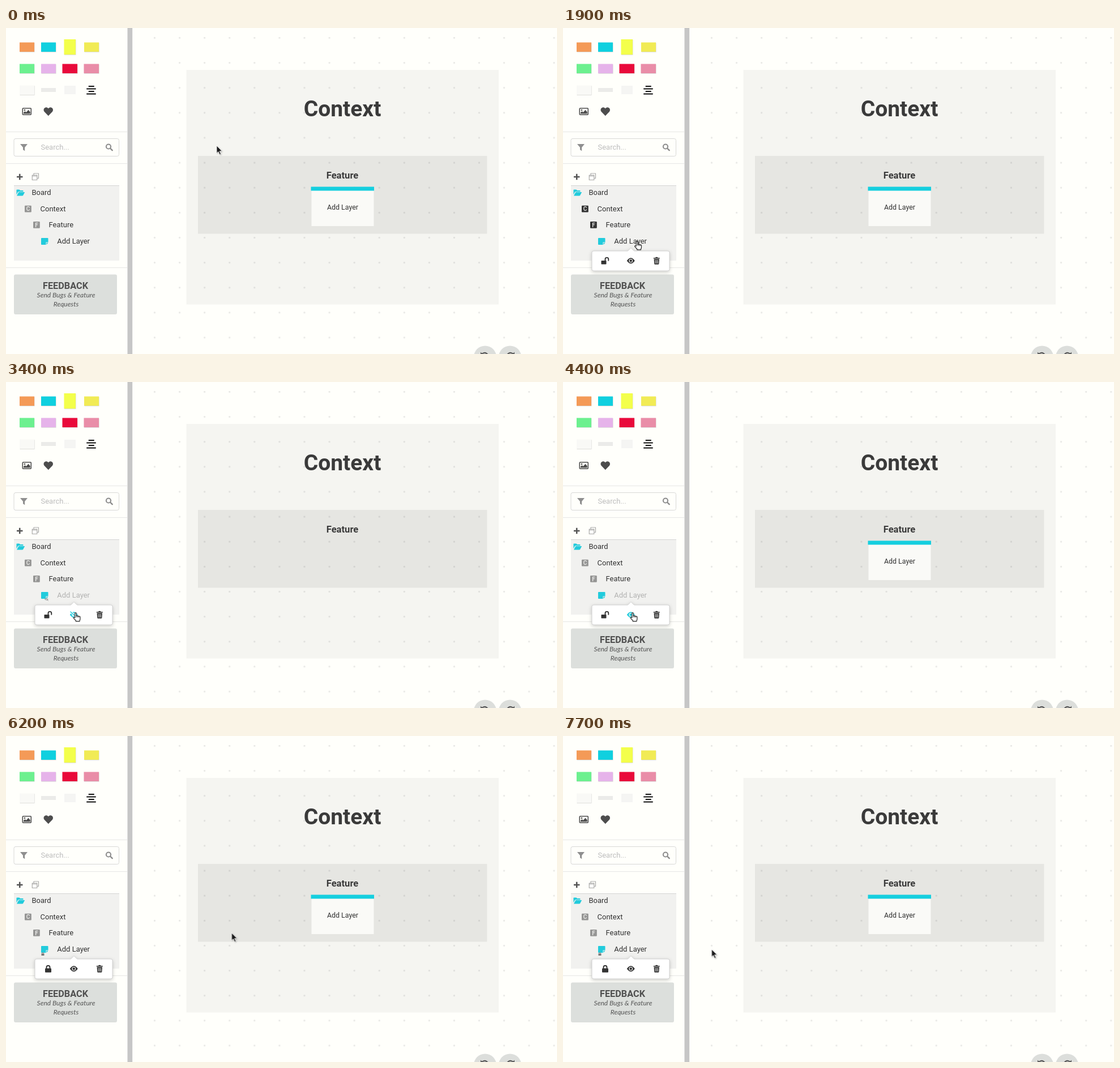
Animation of 973x576 px, one loop 8000 ms. Source, as an HTML page:

```html
<!DOCTYPE html>
<html lang="en">
<head>
<meta charset="utf-8">
<title>Board layers</title>
<style>
  html, body { margin: 0; width: 100%; height: 100%; overflow: hidden; background: #fffffb; }
  svg { display: block; width: 973px; height: 576px; font-family: Roboto, sans-serif; }
  text { fill: #333; }
  .tree { font-size: 13px; }
  .mid { text-anchor: middle; }
  .bold { font-weight: 700; fill: #3a3a3a; }
  .note { font: italic 12px Lato, sans-serif; fill: #555; }
  .line { fill: none; stroke-linecap: round; stroke-linejoin: round; }
  .rule { stroke: #e7e7e5; }
  .badge text { font-size: 10px; font-weight: 500; fill: #f1f1ef; text-anchor: middle; }
  #popup { filter: drop-shadow(0 2px 3px rgba(0, 0, 0, .2)); }
  #arrow { filter: drop-shadow(1px 1px 1px rgba(0, 0, 0, .25)); }
</style>
</head>
<body>
<svg viewBox="0 0 973 576">
  <defs>
    <pattern id="dots" width="44.08" height="44.13" patternUnits="userSpaceOnUse" x="240.5" y="-4.6">
      <circle cx="22" cy="22" r="1.6" fill="#e8e8e5"/>
    </pattern>
    <g id="turn">
      <circle r="20" cy="1.5" fill="#dcdedb"/>
      <path class="line" stroke="#555" stroke-width="2.2" d="M-6.5-2.5A6.3 6.3 0 1 1-5 5"/>
      <path fill="#555" d="M-8-7.500v6.500h6.500z"/>
    </g>
  </defs>

  <!-- board -->
  <rect x="223" width="750" height="576" fill="url(#dots)"/>
  <rect x="318.500" y="74" width="551.500" height="414.500" fill="#000" fill-opacity=".039"/>
  <text class="bold mid" x="594" y="155.500" font-size="39">Context</text>
  <rect x="339" y="226" width="510.500" height="137.500" fill="#000" fill-opacity=".062"/>
  <text class="bold mid" x="594" y="266" font-size="16.600">Feature</text>
  <g id="card">
    <rect x="539.500" y="287" width="110" height="63" fill="#fafaf7"/>
    <rect x="538.500" y="280.500" width="111.500" height="7" fill="#16cfdf"/>
    <text class="mid" x="594.500" y="321" font-size="12.400">Add Layer</text>
  </g>
  <use href="#turn" x="846" y="580"/>
  <use href="#turn" transform="translate(890 580) scale(-1 1)"/>

  <!-- sidebar -->
  <rect x="214.500" width="8.700" height="576" fill="#c6c6c6"/>
  <path class="rule" d="M0 183.500h214M0 239.500h214M0 423.500h214"/>
  <g id="swatches"></g>
  <path class="line" stroke="#111" stroke-width="2" d="M146.500 103h8.500M143 107.500h15M146.500 112h8.500M143 116.500h15"/>
  <rect x="29.300" y="141.800" width="15" height="11.400" rx="1.200" fill="none" stroke="#4d4d4d" stroke-width="1.600"/>
  <path fill="#4d4d4d" d="M31 151.500v-2l2.500-2.500 2 2 4-4.200 3.200 3.500v3.200z"/>
  <circle cx="33" cy="145" r="1.300" fill="#4d4d4d"/>
  <path fill="#4d4d4d" d="M74.800 155.300l-7-7.300c-4-5 2.500-11 7-5.800c4.500-5.200 11 .8 7 5.800z"/>

  <rect x="14" y="195.500" width="185.500" height="31" rx="3" fill="none" stroke="#d8d8d7"/>
  <path fill="#8f8f8f" d="M25 205h13l-4.800 6v6.200l-3.200-2.200v-4z"/>
  <text x="61.500" y="215" font-size="13" style="fill:#bdbdbd">Search...</text>
  <circle cx="181" cy="209.500" r="4.100" fill="none" stroke="#8a8a8a" stroke-width="2"/>
  <path class="line" stroke="#8a8a8a" stroke-width="2.400" d="M184.500 213l3.200 3.200"/>

  <path stroke="#555" stroke-width="2.600" d="M19 263h10.500M24.250 257.750v10.500"/>
  <path class="line" stroke="#a9a9a9" stroke-width="1.200" d="M49 259.500v-2.500h8.500v8.500h-2.500M46.300 260h8.500v8.500h-8.500zM46.300 261.500h8.500"/>

  <rect x="14" y="278.500" width="186" height="132.500" fill="#f1f1ef"/>
  <path stroke="#d5d5d4" d="M14 278.500h186"/>
  <path fill="#22cbdc" d="M18.500 294.500v-8q0-1 1-1h4l1.500 1.500h4.500q1 0 1 1v1.200h-8q-1.200 0-1.800 1z"/>
  <path fill="#22cbdc" d="M19 296.500l3-5.700q.4-.8 1.200-.8h10l-3 5.700q-.4.800-1.200.8z"/>
  <g class="tree">
    <text x="45.500" y="295">Board</text>
    <text x="60.500" y="323.500">Context</text>
    <text x="75.500" y="352">Feature</text>
    <text id="label" x="90.300" y="381">Add Layer</text>
  </g>
  <g class="badge">
    <rect class="mark" x="33" y="313.700" width="11.800" height="11.800" rx="1.300"/>
    <text x="38.900" y="323.200">C</text>
    <rect class="mark" x="48" y="342" width="11.800" height="11.800" rx="1.300"/>
    <text x="53.900" y="351.500">F</text>
  </g>
  <path fill="#22cbdc" d="M63 371h10.500q1 0 1 1v6.500h-4v4.500h-7.500q-1 0-1-1v-10q0-1 1-1zM71.500 379.600h3l-3 3.200z"/>
  <g id="hiddenBadge" class="line" stroke="#999">
    <path d="M69 384q2.700-3 5.400 0q-2.700 3-5.400 0zM69.500 381.500l5 5"/>
  </g>
  <g id="lockBadge">
    <rect x="62.500" y="384.500" width="5" height="3.500" fill="#777"/>
    <path class="line" stroke="#777" d="M63.700 384.500v-1.300q1.300-2 2.600 0v1.300"/>
  </g>

  <rect x="14" y="435.500" width="182" height="70.500" rx="3" fill="#dcdfdc"/>
  <text class="bold mid" x="105" y="460.500" font-size="16.300" style="fill:#505050">FEEDBACK</text>
  <text class="note mid" x="106" y="476">Send Bugs &amp; Feature</text>
  <text class="note mid" x="106" y="491.500">Requests</text>

  <g id="popup">
    <path fill="#fff" stroke="#d2d2d2" d="M54 394h60.500l5.500-5.500 5.500 5.500h59.500q3 0 3 3v29q0 3-3 3h-131q-3 0-3-3v-29q0-3 3-3z"/>
    <g id="unlocked" fill="#333" stroke="#333">
      <rect x="67.500" y="411" width="9" height="6.500" rx=".8" stroke="none"/>
      <path class="line" stroke-width="1.900" d="M74.500 411v-2.500a2.900 2.900 0 0 1 5.800 0v2.200"/>
    </g>
    <g id="locked" fill="#333" stroke="#333">
      <rect x="69" y="410.500" width="11" height="7.200" rx="1" stroke="none"/>
      <path class="line" stroke-width="1.900" d="M71.500 411v-2.200a3 3 0 0 1 6 0v2.200"/>
    </g>
    <g id="eye" fill="#333">
      <path d="M112.800 411.300q7-10 14 0q-7 10-14 0z"/>
      <circle cx="119.800" cy="411.300" r="3.300" fill="#fff"/>
      <circle cx="119.800" cy="411.300" r="2.200"/>
    </g>
    <g id="slash">
      <path stroke="#fff" stroke-width="3.500" d="M113.500 405.500l12.500 11.500"/>
      <path class="line" stroke="#22cbdc" stroke-width="1.500" d="M114 406l12 11"/>
    </g>
    <path fill="#333" d="M159.800 406h3.200l.8-1.200h3l.8 1.200h3.200v1.500h-11zM160.600 408.300h9.400l-.6 8.200q-.1 1.200-1.300 1.200h-5.600q-1.200 0-1.300-1.200z"/>
    <path stroke="#fff" stroke-width=".8" d="M163.200 410v6M165.300 410v6M167.400 410v6"/>
  </g>

  <g id="arrow">
    <path fill="#1a1a1a" stroke="#fff" stroke-width=".8" d="M0 0v13.300l3-2.800 2.300 5.200 2.200-1-2.300-5h4.300z"/>
  </g>
  <g id="hand">
    <path fill="#fff" stroke="#222" stroke-width="1.200" stroke-linejoin="round"
      d="M3.200 9.500V2q0-1.400 1.300-1.400T5.800 2v4.300q1.200-1 2.200.3q1.300-.8 2.200.5q2.300-.4 2.300 1.700v2.700q0 1.500-1 2.800v1.500H4.800v-1.300L.9 10.300q-.6-1.200.4-1.500q.9-.2 1.900.7z"/>
    <path class="line" stroke="#222" stroke-width=".8" d="M5.800 6.300v2.400M8 6.600v2.200M10.200 7.100v1.900"/>
  </g>
</svg>
<script>
const LOOP = 8000;
const $ = id => document.getElementById(id);

// Colour swatches: x, y, width, height, fill
const swatches = [
  [24, 25.5, 26, 16.5, '#f49a57'], [62, 25.5, 26, 16.5, '#10d0df'],
  [102.5, 20, 20.5, 27, '#f3ff4b'], [138, 25.5, 26, 16.5, '#f1eb55'],
  [24, 63.5, 26, 16.5, '#6cf08f'], [62, 63.5, 26, 16.5, '#e6b3ea'],
  [99.5, 63.5, 26.5, 16.5, '#e90a3b'], [137.5, 63.5, 26.5, 16.5, '#e98da8'],
  [24, 101.5, 26, 16.5, '#f9f9f6'], [62, 106, 26, 7, '#ebebe9'], [103, 102, 20, 15, '#f5f5f3']
];
$('swatches').innerHTML = swatches.map(([x, y, w, h, fill], i) =>
  (i < 9 ? `<rect x="${x + .5}" y="${y + .7}" width="${w}" height="${h}" fill="#000" fill-opacity=".18"/>` : '') +
  `<rect x="${x}" y="${y}" width="${w}" height="${h}" fill="${fill}"/>`).join('');

// Holds each value until the next step: [time, value]
function hold(el, prop, steps) {
  const frames = steps.map(([time, value]) => ({ offset: time / LOOP, [prop]: value, easing: 'steps(1, end)' }));
  frames.push({ offset: 1, [prop]: steps.at(-1)[1] });
  el.animate(frames, { duration: LOOP, iterations: Infinity });
}
// Toggles visibility at the given times
function toggle(id, shown, ...times) {
  hold($(id), 'visibility', [0, ...times].map((time, i) => [time, shown === (i % 2 === 0) ? 'visible' : 'hidden']));
}
function move(id, path) {
  hold($(id), 'transform', path.map(([time, x, y]) => [time, `translate(${x}px, ${y}px)`]));
}

const ink = '#333', cyan = '#22cbdc', grey = '#959594';

move('arrow', [
  [0, 372, 208], [600, 364, 225], [700, 338, 260], [800, 290, 300], [900, 235, 335], [1000, 185, 358],
  [6100, 225, 388], [6200, 398.5, 348], [6300, 480, 333], [6400, 530, 325], [6500, 560, 320],
  [6600, 576, 318], [6700, 582, 317], [7600, 400, 352], [7700, 262.5, 377]
]);
move('hand', [
  [0, 147, 365], [1200, 137, 374], [1300, 128, 383], [1400, 124, 384], [1500, 128, 379],
  [1700, 127, 377], [1900, 126, 376], [2000, 130, 375], [2200, 133, 379], [2400, 130, 390],
  [2500, 123, 402], [2600, 118.5, 407], [4900, 112, 410], [5000, 99, 413], [5100, 86, 413],
  [5200, 77, 411], [5300, 73, 408]
]);
toggle('arrow', true, 1100, 6100);
toggle('hand', false, 1100, 6100);

toggle('card', true, 3100, 4400);
toggle('slash', false, 3100, 4400);
toggle('hiddenBadge', false, 3100, 4400);
toggle('lockBadge', false, 5700);
toggle('locked', false, 5700);
toggle('unlocked', true, 5700);

hold($('popup'), 'opacity', [[0, 0], [1700, .35], [1800, .8], [1900, 1]]);
hold($('label'), 'fill', [[0, ink], [3400, '#b3b3b2'], [4800, ink]]);
hold($('eye'), 'fill', [[0, ink], [2600, cyan], [5000, ink]]);
for (const prop of ['fill', 'stroke']) {
  hold($('unlocked'), prop, [[0, ink], [5200, cyan]]);
  hold($('locked'), prop, [[0, cyan], [6100, ink]]);
}
document.querySelectorAll('.mark').forEach(el =>
  hold(el, 'fill', [[0, grey], [1000, ink], [2500, grey]]));
</script>
</body>
</html>
```
